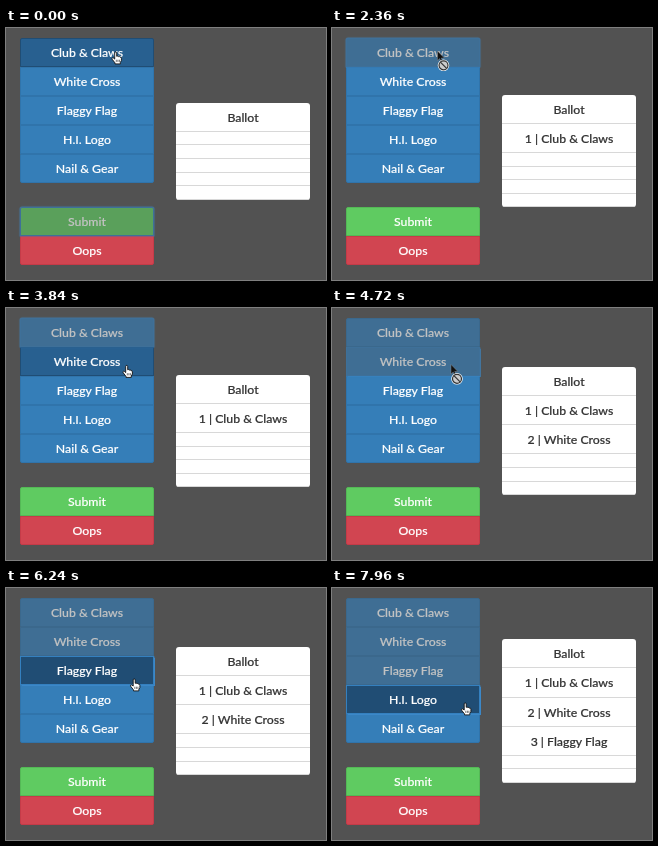
Animation, 320 px wide and 252 px high, one loop 8000 ms. Source, as an HTML page:

```html
<!DOCTYPE html>
<html lang="en">
<head>
<meta charset="utf-8">
<title>Ballot</title>
<style>
  html, body { margin: 0; width: 100%; height: 100%; overflow: hidden; background: #525252; }
  #stage {
    position: relative; width: 320px; height: 252px; overflow: hidden;
    font: 500 12.3px/29px Lato, "Open Sans", sans-serif; text-align: center;
    -webkit-text-stroke: .2px;
  }
  .btn {
    position: absolute; left: 14px; width: 134px; height: 29.1px; box-sizing: border-box;
    border: 1px solid; color: #fff; line-height: 27px; white-space: nowrap;
  }
  .blue { background: #357eb8; border-color: #3074ab; }
  .green { background: #5fcb61; border-color: #54b956; }
  .red { background: #d14551; border-color: #c53b48; }
  .first { border-radius: 2px 2px 0 0; }
  .last { border-radius: 0 0 2px 2px; }
  .hover { background: #286090; border-color: #204d74; }
  .active { background: #204d74; border-color: #1a405f; }
  .off { opacity: .65; }
  .focus { z-index: 1; border-color: #3480bf; box-shadow: 0 0 1px .5px #3c88c8; }
  #ballot {
    position: absolute; left: 170px; width: 134px; overflow: hidden;
    background: #fff; border-radius: 3px; color: #333;
  }
  #ballot div {
    box-sizing: border-box; border-bottom: 1px solid #d8d8d8;
    line-height: 30px; white-space: nowrap;
  }
  #cursor { position: absolute; left: 0; top: 0; z-index: 2; overflow: visible; }
</style>
</head>
<body>
<div id="stage">
  <div id="ballot"></div>
  <svg id="cursor" width="16" height="22">
    <g id="hand" fill="#fff" stroke="#111" stroke-width=".9" stroke-linejoin="round">
      <path d="M0 1.6Q.1.6 1 .6T2 1.6V5Q3 4.4 3.7 5.3 4.7 4.8 5.3 5.8 6.7 5.5 6.7 7V9.2L5.6 11.2V12.6H.3V11.6L-2.5 8Q-3.2 6.8-2.2 6.5-1.4 6.3 0 7.8Z"/>
      <path d="M1.6 8.4V10.6M3.2 8.4V10.6M4.7 8.4V10.6" stroke-width=".6"/>
    </g>
    <g id="denied">
      <path d="M0 0V9.6L2.2 7.6 3.7 11 5.2 10.3 3.7 7H6.8Z" fill="#111" stroke="#999" stroke-width=".4"/>
      <circle cx="6" cy="14.3" r="4.5" fill="none" stroke="#fff" stroke-width="2.6"/>
      <g fill="none" stroke="#333" stroke-width="1.2">
        <circle cx="6" cy="14.3" r="4.5" fill="#ccc"/>
        <path d="M2.9 11.2L9.1 17.4"/>
      </g>
    </g>
  </svg>
</div>
<script>
const LOOP = 8000, ROW = 29.1, SLOT = 13.6, LIST_TOP = 9.5, ACTIONS_TOP = 178.6;
const names = ['Club & Claws', 'White Cross', 'Flaggy Flag', 'H.I. Logo', 'Nail & Gear'];

// Mouse press and release times, one per choice
const clicks = [[1960, 2080], [4000, 4120], [6160, 6320], [7880, 8040]];

// Pointer hot spot: time, x, y
const path = [
  [0, 108, 23], [400, 108, 23], [1000, 105.5, 23], [2760, 105.5, 23],
  [3280, 119, 56.5], [5200, 119, 56.5], [5760, 126.5, 90],
  [6840, 126.5, 90], [7400, 131.5, 114], [8000, 131.5, 114]
];

const $ = id => document.getElementById(id);
const stage = $('stage'), ballot = $('ballot'), cursor = $('cursor');

function addButton(label, top, style) {
  const el = document.createElement('div');
  el.textContent = label;
  el.style.top = top + 'px';
  stage.insertBefore(el, cursor);
  return { el, style: 'btn ' + style };
}

const choices = names.map((name, i) => addButton(name, LIST_TOP + i * ROW,
  'blue' + (i === 0 ? ' first' : i === 4 ? ' last' : '')));
const submit = addButton('Submit', ACTIONS_TOP, 'green first');
const oops = addButton('Oops', ACTIONS_TOP + ROW, 'red last');

const rows = ['Ballot', ...names].map(() => ballot.appendChild(document.createElement('div')));

function setState(button, states) {
  const on = Object.keys(states).filter(key => states[key]);
  button.el.className = [button.style, ...on].join(' ');
}

function pointerAt(t) {
  const next = Math.max(1, path.findIndex(p => p[0] > t));
  const [t0, x0, y0] = path[next - 1], [t1, x1, y1] = path[next];
  const k = (t - t0) / (t1 - t0), ease = k * k * (3 - 2 * k);
  return [x0 + (x1 - x0) * ease, y0 + (y1 - y0) * ease];
}

function drawBallot(votes) {
  const height = ROW * (votes + 1) + SLOT * (5 - votes);
  ballot.style.top = 123.2 - height / 2 + 'px';
  rows.forEach((row, i) => {
    row.style.height = (i <= votes ? ROW : SLOT) + 'px';
    row.textContent = i === 0 ? 'Ballot' : i <= votes ? `${i} | ${names[i - 1]}` : '';
  });
}

function render(t) {
  const pressed = clicks.filter(c => t >= c[0]).length;
  const votes = clicks.filter(c => t >= c[1]).length;
  const [x, y] = pointerAt(t);
  const over = Math.floor((y - LIST_TOP) / ROW);
  const denied = over < votes;

  choices.forEach((button, i) => setState(button, {
    off: i < votes,
    hover: i === over && !denied,
    active: i === pressed - 1 && pressed > votes,
    focus: i === pressed - 1
  }));
  setState(submit, { off: votes === 0, focus: pressed === 0 });
  setState(oops, {});
  drawBallot(votes);

  $('hand').style.display = denied ? 'none' : '';
  $('denied').style.display = denied ? '' : 'none';
  const [dx, dy] = denied ? [0, 0] : [.7, .3];
  cursor.style.transform = `translate(${x + dx}px, ${y + dy}px)`;
}

const start = performance.now();
function tick() {
  render((performance.now() - start) % LOOP);
  requestAnimationFrame(tick);
}
tick();
</script>
</body>
</html>
```
